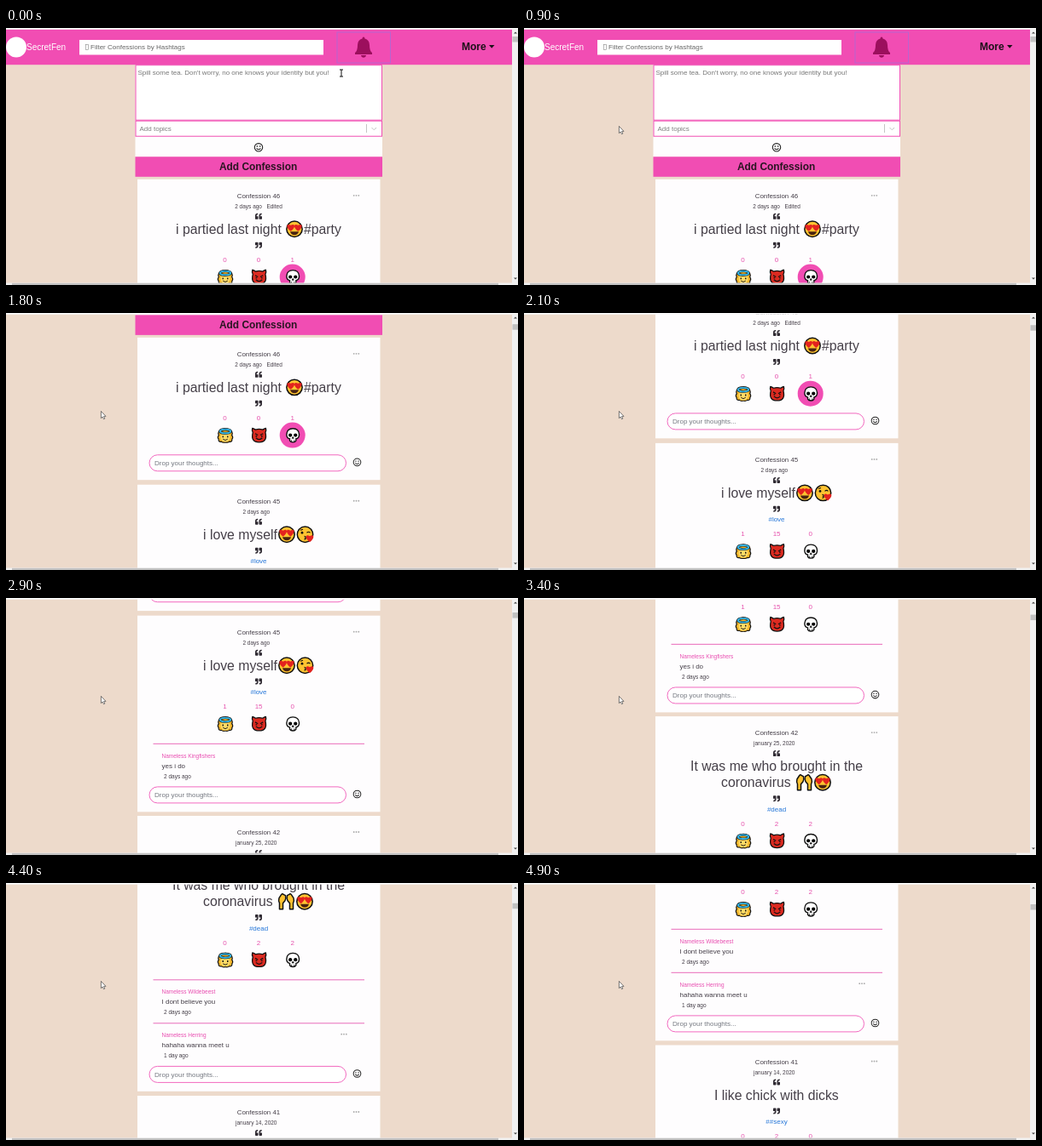
These frames come from a looping animation (600x302 px, 5 s). An HTML page:

```html
<!DOCTYPE html>
<html lang="en">
<head>
<meta charset="utf-8">
<title>Confession feed</title>
<style>
html, body { margin: 0; width: 100%; height: 100%; overflow: hidden; background: #eddacb }
svg { display: block; width: 100%; height: 100%; font-family: "Liberation Sans", Arial, sans-serif }
</style>
</head>
<body>
<svg id="stage" viewBox="0 0 600 302">
  <defs>
    <path id="heart" d="M0 4.500C-6.500-.5-5-5.500 0-2.500C5-5.500 6.500-.5 0 4.500Z" fill="#e3231f"/>
    <g id="love">
      <circle r="9.200" fill="#ffc331" stroke="#111" stroke-width="1.500"/>
      <use href="#heart" x="-4.300" y="-2"/><use href="#heart" x="4.300" y="-2"/>
      <path d="M-5 3H5Q4 7 0 7T-5 3Z" fill="#4a2410"/>
    </g>
    <g id="kiss">
      <circle r="9.200" fill="#ffc331" stroke="#111" stroke-width="1.500"/>
      <circle cx="-3.500" cy="-2" r="1.400" fill="#111"/>
      <path d="M2-2Q4-4 6-2M-1 2Q2 2.500 0 4Q2 5 -1 6M-5.500-5L-2.500-6" fill="none" stroke="#111" stroke-width="1.100"/>
      <use href="#heart" x="5.500" y="4.500"/>
    </g>
    <g id="hands" fill="#ffc331" stroke="#111" stroke-width="1.500" stroke-linejoin="round">
      <path id="hand" d="M-8 9V2Q-9.500-1-8.500-4L-5.500-8.500Q-4.500-9.500-3.500-8.300L-1-7Q-.2-4-1.500-1L-4 2V9Z"/>
      <use href="#hand" transform="scale(-1 1)"/>
    </g>
    <g id="angel" stroke="#111">
      <path d="M-7-6Q-10-3-8.300 0Q-10.500 3-8.500 5Q-9 9-5 8.300Q-3 10 0 9Q3 10 5 8.300Q9 9 8.500 5Q10.500 3 8.300 0Q10-3 7-6Q0-11-7-6Z" fill="#f6b72c" stroke-width="1.300"/>
      <circle cy="2.500" r="6" fill="#ffdb66" stroke="none"/>
      <ellipse cy="-5" rx="6.800" ry="2.500" fill="#f6b72c" stroke-width="3.200"/>
      <ellipse cy="-5" rx="6.800" ry="2.500" fill="none" stroke="#35b5e5" stroke-width="2"/>
      <path d="M-3 5Q0 8 3 5" fill="none"/>
      <path d="M-3 1V3M3 1V3" stroke-width="1.500"/>
    </g>
    <g id="devil" stroke="#111">
      <path d="M-8.500-9Q-6.500-8.500-4.500-7Q0-8.500 4.500-7Q6.500-8.500 8.500-9Q9.500-6 8-3.500Q11 9 0 9T-8-3.500Q-9.500-6-8.500-9Z" fill="#dc2a20" stroke-width="1.400" stroke-linejoin="round"/>
      <path d="M-5-2L-1.500 0M5-2L1.500 0M-4 3.500Q0 7.500 4 3.500" fill="none" stroke-width="1.300"/>
      <path d="M-3.500 .5V2M3.500 .5V2" stroke-width="1.800"/>
    </g>
    <g id="skull">
      <path d="M-4 4.500Q-8 4-8-1Q-7.500-8.500 0-8.500T8-1Q8 4 4 4.500V7Q3 9 0 9T-4 7Z" fill="#fff" stroke="#111" stroke-width="1.500"/>
      <circle cx="-3.300" r="2.300"/><circle cx="3.300" r="2.300"/>
      <path d="M0 2L-1.200 4H1.200ZM-1.700 6V8.500M1.700 6V8.500" stroke="#111" stroke-width=".8"/>
    </g>
    <g id="quote" fill="#302b33">
      <path id="mark" d="M-.5 0H-2.300V-.8Q-2.300-2-1-2H-.8V-3.500H-1.200Q-4-3.500-4-.8V2.600Q-4 3.500-3.200 3.500H-1.300Q-.5 3.500-.5 2.600V.8Z"/>
      <use href="#mark" x="4.500"/>
    </g>
    <g id="smile" fill="none" stroke="#222" stroke-width="1.100">
      <circle r="4.700"/><path d="M-2.400 1Q0 3.800 2.400 1"/>
      <path d="M-1.700-2V-.6M1.700-2V-.6" stroke-width="1.300"/>
    </g>
    <g id="dots" fill="#aaa">
      <circle cx="-2.800" r=".9"/><circle r=".9"/><circle cx="2.800" r=".9"/>
    </g>
  </defs>
  <rect width="600" height="302" fill="#eddacb"/>
  <g id="page"></g>
  <g id="arrow"><path d="M.4 .4V8.600L2.200 7L3.500 9.700L4.800 9.100L3.600 6.400H6Z" fill="#fff" stroke="#444" stroke-width=".7"/></g>
  <path id="beam" d="M-2-4H2M0-4V4M-2 4H2" fill="none" stroke="#111"/>
  <path d="M0 0H600V1.800H0Z" fill="#fafafa"/>
  <path d="M593 1.500H600V302H0V299.500H593Z" fill="#f1f1f1"/>
  <rect x="7" y="299.800" width="570" height="2.200" fill="#c1c1c1"/>
  <path d="M595 6.500L597 4.500L599 6.500ZM595 293.500L597 295.500L599 293.500Z" fill="#444"/>
  <rect id="thumb" x="593.500" y="10" width="6.500" height="6.500" fill="#c1c1c1"/>
</svg>
<script>
const $ = id => document.getElementById(id);
const PINK = '#f14db3', INK = '#453f48', CARD = '#fefdfe', SMALL = 6.5;

// y is the middle of the capitals
const text = (x, y, size, fill, str, attrs = '') =>
  `<text x="${x}" y="${y + size * .36}" font-size="${size}" fill="${fill}" ${attrs}>${str}</text>`;
const mid = (x, y, size, fill, str) => text(x, y, size, fill, str, 'text-anchor="middle"');
const box = (x, y, w, h, fill, attrs = '') =>
  `<rect x="${x}" y="${y}" width="${w}" height="${h}" fill="${fill}" ${attrs}/>`;
const icon = (id, x, y, scale = 1, turn = 0) =>
  `<use href="#${id}" transform="translate(${x} ${y}) rotate(${turn}) scale(${scale})"/>`;

function header() {
  const border = `stroke="${PINK}"`;
  return box(0, 1.5, 593, 41.7, PINK) +
    '<circle cx="12" cy="22.500" r="12" fill="#fff"/>' +
    text(24, 22, 10, '#fff', 'SecretFen') +
    box(86, 14, 286, 17.5, '#fff') +
    box(93.5, 19.5, 3, 6, 'none', 'stroke="#888" stroke-width=".6"') +
    text(99, 22.5, 8, '#666', 'Filter Confessions by Hashtags') +
    box(388, 5, 62.5, 36, 'none', 'stroke="#b765cf"') +
    `<path d="M419 10.500Q420.500 10.500 420.500 12.500Q426 14 426 20Q426 27 429 29V31H409V29Q412 27 412 20Q412 14 417.500 12.500Q417.500 10.500 419 10.500ZM416 32H422Q421.500 34.800 419 34.800T416 32Z" fill="#9c0f5d"/>` +
    text(534, 22, 12, '#1b1018', 'More', 'font-weight="bold"') +
    '<path d="M566 20H572.500L569.200 23.800Z" fill="#1b1018"/>' +
    box(151.5, 43.5, 289.5, 108, CARD) +
    box(152, 43.7, 288.5, 64.5, '#fff', border) +
    text(154.5, 52, 8, '#777', "Spill some tea. Don't worry, no one knows your identity but you!") +
    box(152, 109.2, 288.5, 18, '#fff', border) +
    text(156.5, 118, 8, '#808080', 'Add topics') +
    '<path d="M422.500 113V123M428.500 117L431.300 119.800L434 117" fill="none" stroke="#c4c4c4"/>' +
    icon('smile', 296, 140.3) +
    box(151.5, 151.3, 289.5, 23.5, PINK) +
    text(250, 163, 11.9, '#2a1522', 'Add Confession', 'font-weight="bold"');
}

function card(top, { no, date, note = '', parts, tag, counts, picked, comments = [] }) {
  const rows = Math.max(...parts.map(p => p[1]));
  const end = top + 77.4 + rows * 19.2;
  const countY = end + (tag ? 29.3 : 17);
  const faceY = countY + 20.3;
  let out = mid(296, top + 19.2, 7.9, INK, 'Confession ' + no) + icon('dots', 410.5, top + 19) +
    mid(296, top + 32, SMALL, INK, date + '&#160;'.repeat(3) + note) +
    icon('quote', 296, top + 43.5) + icon('quote', 296, end, 1, 180);
  for (const [x, row, str] of parts) {
    const y = top + 58.5 + row * 19.2;
    out += $(str) ? icon(str, x, y) : text(x, y, 15.8, INK, str);
  }
  if (tag) out += mid(296, end + 12.2, 8, '#2476d8', tag);
  ['angel', 'devil', 'skull'].forEach((face, i) => {
    const x = 256.5 + i * 39.6;
    if (i === picked) out += `<circle cx="${x}" cy="${faceY}" r="15" fill="${PINK}"/>`;
    out += mid(x, countY, 8, '#e654ae', counts[i]) + icon(face, x + .5, faceY, .92);
  });
  let y = faceY + 23.5;
  for (const [name, words, when, menu] of comments) {
    out += box(172.5, y - .4, 247.5, 1, '#e96bba') +
      text(182.5, y + 14, SMALL, '#e84db0', name) +
      text(182.5, y + 25.5, 8, INK, words) +
      text(185, y + 38, SMALL, INK, when);
    if (menu) out += icon('dots', 396, y + 13);
    y += 51;
  }
  out += box(168, y - .3, 230.5, 19, '#fff', `rx="9.500" stroke="#f268bf"`) +
    text(174, y + 9, 8, '#747880', 'Drop your thoughts...') + icon('smile', 411.5, y + 8.3, .92);
  return box(154, top, 284.5, y + 29.1 - top, CARD) + out;
}

$('page').innerHTML = header() +
  card(177.8, { no: 46, date: '2 days ago', note: 'Edited', counts: [0, 0, 1], picked: 2,
    parts: [[199, 0, 'i partied last night'], [338, 0, 'love'], [349, 0, '#party']] }) +
  card(350.7, { no: 45, date: '2 days ago', tag: '#love', counts: [1, 15, 0],
    parts: [[231, 0, 'i love myself'], [329, 0, 'love'], [350.5, 0, 'kiss']],
    comments: [['Nameless Kingfishers', 'yes i do', '2 days ago']] }) +
  card(586, { no: 42, date: 'january 25, 2020', tag: '#dead', counts: [0, 2, 2],
    parts: [[195, 0, 'It was me who brought in the'], [231, 1, 'coronavirus'], [328.5, 1, 'hands'], [350, 1, 'love']],
    comments: [['Nameless Wildebeest', 'I dont believe you', '2 days ago'],
               ['Nameless Herring', 'hahaha wanna meet u', '1 day ago', true]] }) +
  card(892, { no: 41, date: 'january 14, 2020', tag: '##sexy', counts: [0, 2, 0],
    parts: [[223, 0, 'I like chick with dicks']] });

const scrollKeys = [[0, 0], [900, 0], [1300, 67.5], [2100, 197.8], [2900, 330], [3800, 540.5], [4400, 642], [4900, 701.5]];
const mouseKeys = [[0, 393, 53], [300, 260, 215], [400, 200, 230], [600, 122, 190], [900, 111, 115], [5000, 111, 115]];

function at(keys, t) {
  const i = Math.max(1, keys.findIndex(k => k[0] >= t));
  const a = keys[i - 1], b = keys[i], f = (t - a[0]) / (b[0] - a[0]);
  return a.slice(1).map((v, j) => v + (b[j + 1] - v) * f);
}

function draw(now) {
  const t = Math.floor(now % 5000 / 100) * 100;
  const [scroll] = at(scrollKeys, t), [x, y] = at(mouseKeys, t);
  const typing = x > 152 && y < 108;
  $('page').setAttribute('transform', `translate(0 ${-scroll})`);
  $('thumb').setAttribute('y', 10 + scroll * .0214);
  for (const id of ['arrow', 'beam']) {
    $(id).setAttribute('transform', `translate(${x} ${y})`);
    $(id).setAttribute('visibility', (id === 'beam') === typing ? 'visible' : 'hidden');
  }
}

const start = performance.now();
function tick() {
  draw(performance.now() - start);
  requestAnimationFrame(tick);
}
tick();
</script>
</body>
</html>
```
